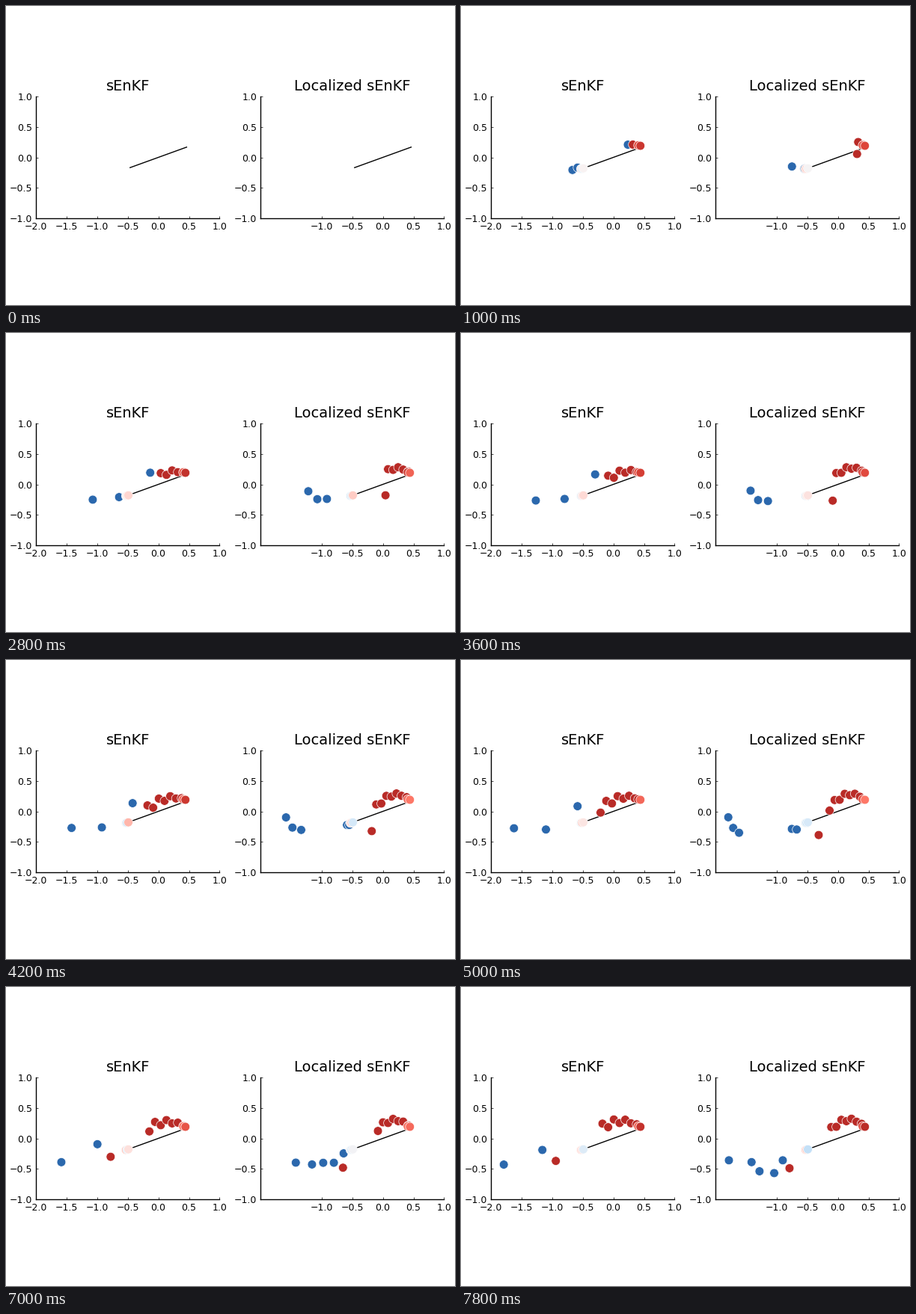
A matplotlib script that plays this animation: 600x400 px, repeating every 8000 ms.

```python
import numpy as np
import matplotlib
import matplotlib.pyplot as plt
from matplotlib.animation import FuncAnimation
from matplotlib.colors import LinearSegmentedColormap

matplotlib.rcParams["font.family"] = "DejaVu Sans"

FRAMES, STEP_MS = 40, 200
W, H = 600, 400
LAST = FRAMES - 1

ANGLE = np.radians(20)
NOSE = np.array([-0.49, -0.18])
TAIL = np.array([0.442, 0.19])
RED, BLUE = 1.0, -1.0

STRENGTH = LinearSegmentedColormap.from_list("strength", [
    (0.00, "#2b68ad"), (0.25, "#63a6de"), (0.40, "#cbe5f9"), (0.50, "#f8f4f4"),
    (0.60, "#ffd5cf"), (0.70, "#ffa799"), (0.76, "#ff7b6b"), (0.88, "#dd4439"),
    (1.00, "#b92b27"),
])


def drift(sign, tip, start, stop, end, lift=0.0, ease=1.0):
    """A strong vortex that leaves a tip and follows a bowed path to its end."""
    def place(i):
        if not start < i <= stop:
            return None
        s = ((i - start) / (stop - start)) ** ease
        x, y = tip + (np.array(end) - tip) * s
        return x, y + 4 * lift * s * (1 - s), sign
    return place


def chain(speed, rise, fall, trend, sway, period=3, life=21):
    """Red vortices released in a steady row, curling over behind the tail."""
    def link(k):
        birth = 1 + k * period
        slope = rise + trend * birth + sway * (-1) ** k

        def place(i):
            age = i - birth
            if not 0 < age <= life:
                return None
            return TAIL[0] - speed * age, TAIL[1] + slope * age - fall * age ** 2, RED
        return place
    return [link(k) for k in range(FRAMES // period)]


def young(tip, step, count, low, high, rng):
    """The newest vortices at a tip; each keeps its strength as it ages."""
    strength = rng.uniform(low, high, FRAMES)

    def at_age(k):
        def place(i):
            if i <= k:
                return None
            x, y = tip + k * np.array(step)
            return x, y, strength[i - k]
        return place
    return [at_age(k) for k in reversed(range(count))]


def wake(seed, strong, row):
    rng = np.random.default_rng(seed)
    return [
        *strong, *row,
        *young(NOSE, (-0.02, -0.005), 3, -0.25, 0.35, rng),
        *young(TAIL, (-0.037, 0.008), 2, 0.5, 1.0, rng),
    ]


global_wake = wake(3, [
    drift(BLUE, TAIL, 0, LAST, (-1.16, -0.19), lift=0.15),
    drift(BLUE, NOSE, 0, 33, (-2.05, -0.27), lift=-0.04, ease=1.15),
    drift(BLUE, NOSE, 2, 12, (-0.87, -0.19), lift=0.02, ease=1.15),
    drift(BLUE, NOSE, 9, LAST, (-1.79, -0.43), ease=1.2),
    drift(RED, NOSE, 26, LAST, (-0.94, -0.37), ease=1.2),
], chain(speed=0.031, rise=0.004, fall=0.0006, trend=0.0004, sway=0.003))

local_wake = wake(8, [
    drift(BLUE, NOSE, 0, 30, (-2.05, -0.10), lift=0.03),
    drift(BLUE, NOSE, 4, 30, (-2.00, -0.27), lift=-0.03),
    drift(BLUE, NOSE, 2, 30, (-2.00, -0.42), lift=0.01, ease=1.5),
    drift(BLUE, NOSE, 16, LAST, (-1.78, -0.36), lift=-0.11, ease=1.7),
    drift(BLUE, NOSE, 17, LAST, (-1.41, -0.39), lift=-0.12, ease=1.6),
    drift(BLUE, NOSE, 23, LAST, (-1.28, -0.54), ease=1.7),
    drift(BLUE, NOSE, 25, LAST, (-1.04, -0.57), ease=1.7),
    drift(BLUE, NOSE, 30, LAST, (-0.90, -0.36), ease=1.7),
    drift(RED, TAIL, 0, LAST, (-0.79, -0.49), lift=-0.17, ease=1.1),
], chain(speed=0.0275, rise=0.018, fall=0.0012, trend=0.0002, sway=0.002))


def panel(fig, left, title, xticks):
    ax = fig.add_axes([left / W, 116 / H, 245.4 / W, 163 / H])
    ax.set(xlim=(-2, 1), ylim=(-1, 1), xticks=xticks, yticks=np.arange(-1, 1.1, 0.5))
    ax.xaxis.set_major_formatter("{x:.1f}")
    ax.yaxis.set_major_formatter("{x:.1f}")
    ax.set_title(title, fontsize=14)
    ax.tick_params(direction="in", labelsize=9, length=2.2, width=0.5, pad=3.5)
    ax.spines[["top", "right"]].set_visible(False)
    ax.spines[["left", "bottom"]].set_linewidth(1)
    dx, dy = 0.5 * np.cos(ANGLE), 0.5 * np.sin(ANGLE)
    ax.plot([-dx, dx], [-dy, dy], color="black", lw=1, solid_capstyle="butt", zorder=1)
    return ax.scatter([], [], s=8.5 ** 2, linewidths=0.5, edgecolors="white", zorder=2)


fig = plt.figure(figsize=(W / 100, H / 100), dpi=100, facecolor="white")
panels = [
    (panel(fig, 40, "sEnKF", np.arange(-2, 1.1, 0.5)), global_wake),
    (panel(fig, 340, "Localized sEnKF", np.arange(-1, 1.1, 0.5)), local_wake),
]


def draw(i):
    for dots, vortices in panels:
        found = [v for v in (place(i) for place in vortices) if v is not None]
        x, y, strength = np.array(found).reshape(-1, 3).T
        dots.set_offsets(np.column_stack([x, y]))
        dots.set_facecolors(STRENGTH((strength + 1) / 2))
    return [dots for dots, _ in panels]


anim = FuncAnimation(fig, draw, frames=FRAMES, interval=STEP_MS,
                     init_func=lambda: draw(0), repeat=True, repeat_delay=0)
plt.show()
```
